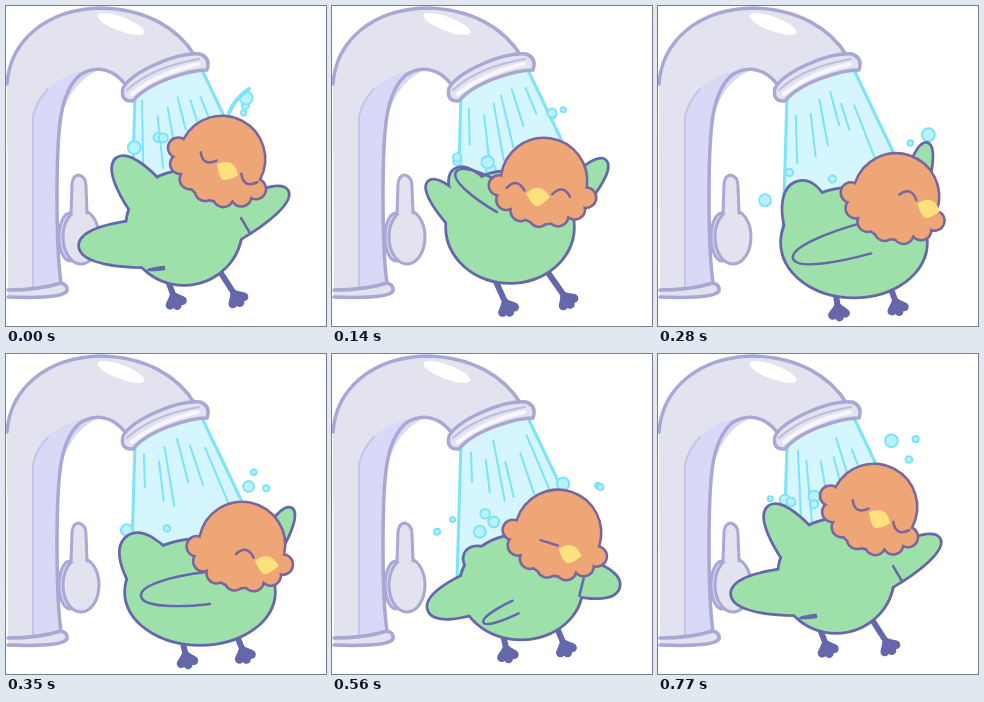
These frames come from a looping animation (320x320 px, 840 ms). An HTML page with a canvas:

```html
<!DOCTYPE html>
<html lang="en">
<head>
<meta charset="utf-8">
<title>Bird shower</title>
<style>
html, body { margin: 0; width: 100%; height: 100%; overflow: hidden; background: #fff; }
canvas { display: block; width: 100%; height: 100%; }
</style>
</head>
<body>
<canvas id="stage" width="320" height="320"></canvas>
<script>
const ctx = document.getElementById('stage').getContext('2d');
const INK = '#6567ab', GREEN = '#9de0a9', ORANGE = '#eea677', HEAD_INK = '#7a669f', BEAK = '#fde17f';
const METAL = '#e3e2ef', SHADE = '#d9d8f6', METAL_INK = '#a9a7d3';
const WATER = '#d5f6ff', FOAM = '#7ce3f8';
const STEP = 70, COUNT = 12, TURN = Math.PI * 2, HEAD_R = 42;

// Key poses. body: centre and radii; near, far, tail, fold: root, tip, half width;
// head: centre and tilt; face: offset on the head and mood (1 smiles up); feet: two points.
const back = {
  body: [178, 222, 57, 56], near: [152, 206, 111, 153, 21], far: [225, 218, 281, 185, 17],
  tail: [150, 237, 74, 240, 23], fold: [158, 262, 142, 264, 1],
  head: [216, 153, 28], face: [10, 4, -1], feet: [168, 291, 229, 289]
};
const front = {
  body: [178, 221, 63, 55], near: [152, 205, 123, 164, 20], far: [238, 195, 273, 155, 14],
  tail: [130, 212, 97, 176, 14], fold: [172, 194, 124, 166, 14],
  head: [212, 175, 8], face: [-4, 12, 1], feet: [174, 298, 233, 291]
};
const turned = {
  body: [198, 235, 70, 56], near: [150, 208, 158, 170, 22], far: [250, 170, 253, 121, 11],
  tail: [170, 240, 140, 250, 10], fold: [216, 230, 135, 263, 16],
  head: [240, 190, 25], face: [41, -16, 1], feet: [180, 302, 239, 297]
};
const sitting = {
  body: [194, 238, 74, 52], near: [152, 226, 122, 183, 25], far: [265, 190, 285, 155, 11],
  tail: [170, 240, 140, 240, 10], fold: [202, 234, 135, 242, 16],
  head: [236, 191, 12], face: [28, 10, 1], feet: [180, 302, 237, 297]
};
const spread = {
  body: [200, 244, 64, 45], near: [185, 236, 160, 218, 16], far: [260, 222, 291, 255, 20],
  tail: [158, 232, 106, 254, 19], fold: [206, 244, 156, 273, 13],
  head: [238, 194, 10], face: [22, 17, 1], feet: [182, 302, 238, 296]
};
const leaning = {
  body: [178, 222, 57, 58], near: [152, 208, 109, 178, 20], far: [228, 223, 282, 211, 16],
  tail: [146, 238, 88, 258, 21], fold: [161, 262, 147, 264, 1],
  head: [214, 164, 25], face: [13, 7, -1], feet: [167, 290, 226, 285]
};

const mix = (a, b, t) => {
  if (typeof a === 'number') return a + (b - a) * t;
  if (Array.isArray(a)) return a.map((v, i) => mix(v, b[i], t));
  return Object.fromEntries(Object.keys(a).map(k => [k, mix(a[k], b[k], t)]));
};
const half = (a, b) => mix(a, b, .5);
const poses = [
  back, half(back, front), front, turned, half(turned, sitting), sitting,
  half(sitting, spread), spread, half(spread, leaning), leaning, half(leaning, back), back
];

function paint(path, fill, ink, width = 3) {
  if (fill) { ctx.fillStyle = fill; ctx.fill(path); }
  if (ink) { ctx.strokeStyle = ink; ctx.lineWidth = width; ctx.stroke(path); }
}
// One outline around several overlapping shapes.
function paintJoined(paths, fill, ink, width) {
  for (const path of paths) paint(path, null, ink, width);
  for (const path of paths) paint(path, fill);
}
function oval(x, y, rx, ry = rx, tilt = 0) {
  const path = new Path2D();
  path.ellipse(x, y, rx, ry, tilt, 0, TURN);
  return path;
}
// Rounded leaf from a wide root to a blunt tip.
function petal([x, y, tx, ty, w]) {
  const a = Math.atan2(ty - y, tx - x), nx = -Math.sin(a) * w, ny = Math.cos(a) * w;
  const mx = mix(x, tx, .5), my = mix(y, ty, .5);
  return new Path2D(`M${x + nx} ${y + ny}C${mx + nx} ${my + ny} ${tx + nx * .7} ${ty + ny * .7} ${tx} ${ty}` +
    `C${tx - nx * .7} ${ty - ny * .7} ${mx - nx} ${my - ny} ${x - nx} ${y - ny}`);
}
function random(seed) {
  return () => (seed = (seed * 16807 + 11) % 2147483647) / 2147483647;
}

// Point in the spray: u runs across it, v along it.
const spray = (u, v) => [mix(mix(129, 196, u), mix(125, 254, u), v), mix(mix(90, 66, u), mix(225, 186, u), v)];

function drawWater(index) {
  paint(new Path2D('M129 88L125 225L170 220L230 190L238 152L196 62Z'), WATER);
  const next = random(index * 7919 + 137), streaks = new Path2D();
  paint(new Path2D('M129 90L125 225M196 64L238 152'), null, FOAM, 3);
  for (let i = 1; i < 7; i++) {
    const u = i / 7 + (next() - .5) * .08, from = .05 + next() * .2;
    streaks.moveTo(...spray(u, from));
    streaks.lineTo(...spray(u, from + .2 + next() * .3));
  }
  paint(streaks, null, FOAM, 2);
}

function drawBubbles(index, [hx, hy]) {
  const next = random(index * 104729 + 31);
  for (let i = 0; i < 8; i++) {
    const left = i < 5, r = 2.5 + next() * 4;
    const x = left ? mix(104, 180, next()) : hx + 5 + next() * 38;
    const y = left ? hy - 25 + next() * 30 : hy - 45 - next() * 28;
    paint(oval(x, y, r), '#b9f1fd', FOAM, 2);
  }
  if (index % 3 === 0) paint(new Path2D(`M${hx + 7} ${hy - 46}q6 -15 20 -24`), null, FOAM, 4);
}

function drawFaucet() {
  const outer = 'M1 78C4 35 40 3 95 2C140 3 172 22 189 50';
  const inner = 'C108 64 91 58 74 69C54 86 51 120 51 190Q51 250 55 277';
  const foot = 'Q62 279 61 285Q56 293 2 291';
  paint(new Path2D(outer + 'L119 78' + inner + foot + 'L1 78Z'), METAL);
  paint(new Path2D('M27 280V110C31 84 61 62 96 63Q67 73 56 109C49 152 51 220 54 278Z'), SHADE);
  paint(new Path2D('M27 280V110Q31 94 42 83'), null, '#c6c4e8', 2);
  paint(new Path2D(outer + 'M119 78' + inner + 'Q33 284 2 284M55 277' + foot), null, METAL_INK, 3.5);
  paint(oval(115, 18, 25, 7, .36), '#fff');

  paint(oval(64, 231, 11, 24), SHADE, METAL_INK);
  paint(oval(75, 231, 18, 27), METAL, METAL_INK);
  paint(new Path2D('M65 208L66 178Q67 169 73 169Q80 171 80 180L81 207'), METAL, METAL_INK);

  paint(new Path2D('M117 82C126 66 170 46 194 48Q205 52 201 64C184 64 142 76 127 95Q114 96 117 82Z'), METAL, METAL_INK, 3.5);
  paint(new Path2D('M126 88Q152 67 192 58'), null, '#f7f7fd', 4);
  paint(new Path2D('M121 84Q146 61 193 53'), null, '#bdbbdf', 2);
}

function drawLegs([cx, cy, , ry], feet) {
  for (const side of [0, 1]) {
    const x = cx - 20 + side * 55, y = cy + ry * .75;
    const [ax, ay] = feet.slice(side * 2);
    const aim = Math.atan2(ay - y, ax - x);
    paint(new Path2D(`M${x} ${y}L${ax} ${ay}`), null, INK, 6);
    for (const turn of [-.8, 0, .8]) {
      paint(new Path2D(`M${ax} ${ay}l${9 * Math.cos(aim + turn)} ${9 * Math.sin(aim + turn)}`), null, INK, 9);
    }
  }
}

function drawHead([x, y, tilt], [fx, fy, mood]) {
  ctx.save();
  ctx.translate(x, y);
  ctx.rotate(tilt * TURN / 360);
  const parts = [oval(0, 0, HEAD_R)];
  for (let i = 0; i < 7; i++) {
    const a = mix(.3, Math.PI - .3, i / 6);
    parts.push(oval(46 * Math.cos(a), 36 * Math.sin(a), 9));
  }
  paintJoined(parts, ORANGE, HEAD_INK, 5);
  for (const side of [-1, 1]) {
    const ex = fx + side * 23;
    if (ex < 40) paint(new Path2D(`M${ex - 9} ${fy}q9 ${-12 * mood} 18 0`), null, HEAD_INK, 2.5);
  }
  paint(new Path2D(`M${fx - 12} ${fy + 3}Q${fx} ${fy - 12} ${fx + 12} ${fy + 3}Q${fx + 4} ${fy + 14} ${fx} ${fy + 14}Q${fx - 4} ${fy + 14} ${fx - 12} ${fy + 3}Z`), BEAK);
  ctx.restore();
}

function drawBird({ body, near, far, tail, fold, head, face, feet }) {
  drawLegs(body, feet);
  paintJoined([oval(...body), ...[near, far, tail].map(petal)], GREEN, INK, 5.5);
  paint(petal(fold), null, INK, 2.5);
  const [x, y, tx, ty, w] = far, a = Math.atan2(ty - y, tx - x);
  const px = mix(x, tx, .18), py = mix(y, ty, .18);
  paint(new Path2D(`M${px} ${py}l${-Math.sin(a) * w} ${Math.cos(a) * w}`), null, INK, 2.5);
  drawHead(head, face);
}

function draw(index) {
  const pose = poses[index];
  ctx.fillStyle = '#fff';
  ctx.fillRect(0, 0, 320, 320);
  ctx.lineCap = ctx.lineJoin = 'round';
  drawWater(index);
  drawFaucet();
  drawBubbles(index, pose.head);
  drawBird(pose);
}

const began = performance.now();
function tick() {
  draw(Math.floor((performance.now() - began) / STEP) % COUNT);
  requestAnimationFrame(tick);
}
tick();
</script>
</body>
</html>
```
